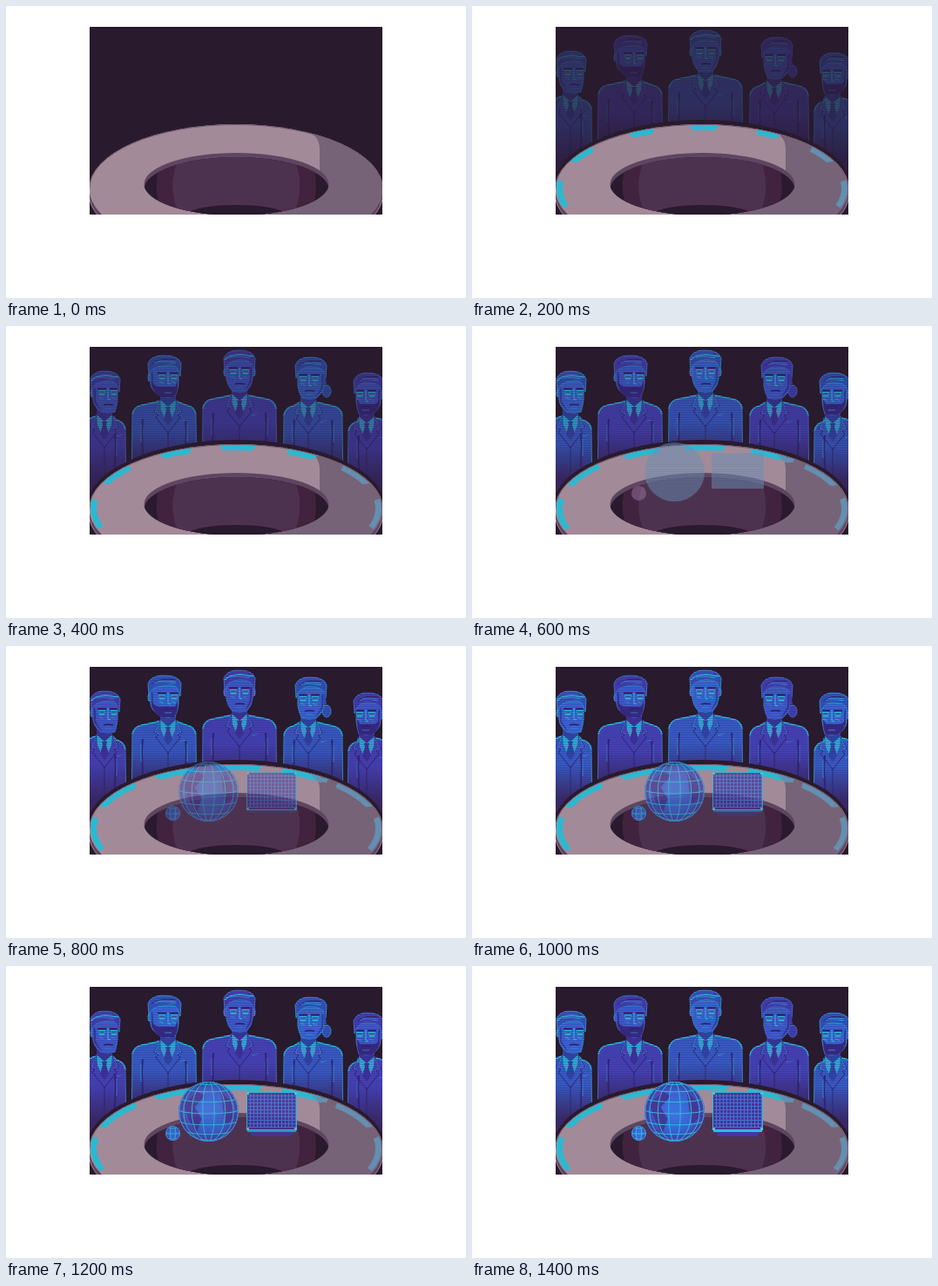
Write an HTML page with a canvas that moves like this. It is 528 by 336 pixels and loops after 1600 ms.

```html
<!DOCTYPE html>
<html lang="en">
<head>
<meta charset="utf-8">
<title>Hologram meeting</title>
<style>
html, body { margin: 0; width: 100%; height: 100%; overflow: hidden; background: #fff; }
canvas { display: block; }
</style>
</head>
<body>
<canvas id="stage" width="528" height="336"></canvas>
<script>
const W = 528, H = 336, STEP = 200, STEPS = 8;
const main = document.getElementById('stage').getContext('2d');
const layerCanvas = document.createElement('canvas');
layerCanvas.width = W;
layerCanvas.height = H;
const layer = layerCanvas.getContext('2d');

const DARK = '#291a2d', CYAN = '#2ab9d2', GLOW = '#2fc3e2', VIOLET = '#35277f';
const BLUE = { suit: '#3563cf', side: '#2f48a8', face: '#3670e2', hair: '#3059c4', edge: '#2fa6de', ink: '#2d2670' };
const PURPLE = { suit: '#4645bd', side: '#3c339a', face: '#3d62d8', hair: '#4440b4', edge: '#3a83d8', ink: '#302068' };

// State of each step: figure opacity, lamp length, prop opacity
const FIGURES = [0, .35, .68, .84, .97, 1, 1, 1];
const LAMPS = [0, .8, 1, 1.18, 1.32, 1.35, 1.35, 1.35];
const PROPS = [0, 0, 0, 0, .5, .75, .9, 1];

const rad = deg => deg * Math.PI / 180;

function poly(g, pts, fill, stroke, width = 1) {
  g.beginPath();
  pts.forEach(([x, y], i) => i ? g.lineTo(x, y) : g.moveTo(x, y));
  if (fill) { g.closePath(); g.fillStyle = fill; g.fill(); }
  if (stroke) { g.strokeStyle = stroke; g.lineWidth = width; g.stroke(); }
}

function oval(g, x, y, rx, ry, fill, stroke) {
  g.beginPath();
  g.ellipse(x, y, rx, ry, 0, 0, Math.PI * 2);
  if (fill) { g.fillStyle = fill; g.fill(); }
  if (stroke) { g.strokeStyle = stroke; g.lineWidth = 1; g.stroke(); }
}

function path(g, d, fill, stroke, width = 1) {
  const p = new Path2D(d);
  if (fill) { g.fillStyle = fill; g.fill(p); }
  if (stroke) { g.strokeStyle = stroke; g.lineWidth = width; g.stroke(p); }
}

function scanlines(g, alpha) {
  g.save();
  g.globalCompositeOperation = 'source-atop';
  g.globalAlpha = alpha;
  g.fillStyle = VIOLET;
  for (let y = 25; y < 240; y += 2) g.fillRect(96, y, 336, 1);
  g.restore();
}

// Draws on a clean layer, then blends it into the stage
function blend(alpha, lines, draw) {
  layer.clearRect(0, 0, W, H);
  draw(layer);
  scanlines(layer, lines);
  main.globalAlpha = alpha;
  main.drawImage(layerCanvas, 0, 0);
  main.globalAlpha = 1;
}

function drawBody(g, f, c) {
  const { neck: n, left: l, right: r, collar: y } = f, b = 200;
  const fade = g.createLinearGradient(0, y, 0, y + 72);
  fade.addColorStop(0, c.suit);
  fade.addColorStop(.45, c.suit);
  fade.addColorStop(1, '#39275c');
  path(g, `M${l} ${b}L${l + 1} ${y + 16}Q${l + 2} ${y + 6} ${l + 12} ${y + 4}L${n - 9} ${y - 1}
    L${n + 9} ${y - 1}L${r - 12} ${y + 4}Q${r - 2} ${y + 6} ${r - 1} ${y + 16}L${r} ${b}Z`, fade, c.edge);
  for (const s of [-1, 1]) {
    const tip = s < 0 ? l : r;
    path(g, `M${tip - s} ${y + 15}Q${tip - s * 2} ${y + 6} ${tip - s * 12} ${y + 4}L${n + s * 10} ${y}`, null, GLOW, 1.5);
  }
  poly(g, [[n - 9, y - 14], [n + 9, y - 14], [n + 9, y + 2], [n, y + 9], [n - 9, y + 2]], c.side);
  poly(g, [[n - 9, y - 2], [n, y + 6], [n + 9, y - 2], [n + 8, y + 10], [n, y + 28], [n - 8, y + 10]], GLOW);
  poly(g, [[n - 3, y + 6], [n + 3, y + 6], [n + 2, y + 10], [n + 5, y + 20], [n, y + 28], [n - 5, y + 20], [n - 2, y + 10]], c.side);
  for (const s of [-1, 1]) {
    poly(g, [[n + s * 9, y - 1], [n + s * 16, y + 12], [n + s * 11, y + 15], [n + s * 14, y + 18], [n, y + 36]], null, c.ink);
    poly(g, [[n + s * 10, y + 1], [n + s * 15, y + 12], [n + s * 10, y + 14]], null, c.edge);
    const side = s < 0 ? l + 13 : r - 13;
    poly(g, [[side, y + 20], [side + s, y + 34], [side - s * 2, b]], null, c.ink, 2);
    poly(g, [[side + s * 2, y + 26], [side + s * 2, y + 46]], null, c.edge);
  }
  poly(g, [[n, y + 34], [n, b]], null, c.ink);
  poly(g, [[n + 14, y + 23], [n + 21, y + 21]], null, c.edge);
}

function drawHead(g, f, c) {
  const { x, top: t, half: w, turn: d } = f, chin = t + 48;
  if (f.woman) {
    oval(g, x + 18, t + 39, 5, 7, c.hair, c.edge);
  } else {
    for (const s of [-1, 1]) if (s !== Math.sign(d)) oval(g, x + s * (w - 2), t + 25, 2, 5, c.face, GLOW);
  }
  path(g, `M${x - w + 3} ${t + 12}L${x - w + 3} ${t + 33}Q${x - w + 4} ${t + 41} ${x - 8 + d} ${chin - 1}
    Q${x + d} ${chin + 1} ${x + 8 + d} ${chin - 1}Q${x + w - 4} ${t + 41} ${x + w - 3} ${t + 33}L${x + w - 3} ${t + 12}Z`, c.face, c.edge);
  const back = d > 0 ? -1 : 1;
  poly(g, [[x + back * (w - 3), t + 15], [x + back * (w - 6), t + 22], [x + back * (w - 6), t + 34],
    [x + d + back * 6, chin], [x + back * (w - 4), t + 36]], c.side);
  if (f.beard) {
    path(g, `M${x - w + 4} ${t + 29}Q${x - w + 7} ${t + 37} ${x + d - 6} ${t + 36}L${x + d + 6} ${t + 36}
      Q${x + w - 6} ${t + 37} ${x + w - 4} ${t + 29}Q${x + w - 3} ${t + 41} ${x + d + 7} ${chin}L${x + d - 7} ${chin}
      Q${x - w + 4} ${t + 43} ${x - w + 4} ${t + 29}Z`, VIOLET);
  }
  for (const s of [-1, 1]) {
    const e = x + d + s * 7;
    poly(g, [[e - 5, t + 20], [e + 5, t + 20]], null, c.ink, 2);
    poly(g, [[e - 4, t + 22], [e + 4, t + 22], [e + 3, t + 28], [e - 3, t + 28]], GLOW);
    poly(g, [[e - 3, t + 24], [e + 3, t + 24]], null, c.ink);
    poly(g, [[e - 3, t + 30], [e + 2, t + 32]], null, c.edge, 2);
  }
  poly(g, [[x + d, t + 20], [x + d, t + 32], [x + d + 3, t + 33]], null, GLOW, 1.5);
  poly(g, [[x + d - 5, t + 39], [x + d, t + 38], [x + d + 6, t + 39]], null, c.ink, 1.5);
  poly(g, [[x + d - 4, t + 43], [x + d + 4, t + 43]], null, c.edge);

  const part = x + (f.woman ? -3 : d * 1.5);
  path(g, `M${x - w + 1} ${t + 24}L${x - w} ${t + 9}Q${x - w + 3} ${t + 1} ${x - 4} ${t}
    Q${x + w - 3} ${t - 1} ${x + w} ${t + 9}L${x + w - 1} ${t + 24}L${x + w - 4} ${t + 16}
    Q${x + w - 6} ${t + 11} ${part} ${t + 11}Q${x - w + 7} ${t + 12} ${x - w + 3} ${t + 18}Z`, c.hair, c.edge);
  if (f.woman) poly(g, [[x + w - 2, t + 16], [x + w, t + 32], [x + w - 5, t + 29]], c.hair);
  for (let i = 0; i < 3; i++) {
    path(g, `M${x - w + 4 + i * 3} ${t + 10 - i}Q${x - 6} ${t + 2 + i * 2} ${x + w - 6} ${t + 5 + i * 2}`, null, i ? c.edge : c.ink);
  }
  if (f.sweep) path(g, `M${x - w + 1} ${t + 11}Q${x - 7} ${t + 1} ${x + w - 2} ${t + 7}`, null, GLOW, 1.5);
}

const CAST = [
  { x: 114, top: 52, half: 17, turn: 3, neck: 113, left: 80, right: 138, collar: 104, sweep: true },
  { x: 182, top: 34, half: 19, turn: 4, neck: 186, left: 144, right: 219, collar: 87, beard: true },
  { x: 268, top: 28, half: 18, turn: 0, neck: 268, left: 225, right: 311, collar: 80, sweep: true },
  { x: 350, top: 36, half: 18, turn: -2, neck: 347, left: 318, right: 387, collar: 88, woman: true },
  { x: 416, top: 54, half: 17, turn: -3, neck: 414, left: 392, right: 452, collar: 106, beard: true }
];

function drawCast(g, step) {
  CAST.forEach((f, i) => {
    const c = (i + step) % 2 ? BLUE : PURPLE;
    drawBody(g, f, c);
    drawHead(g, f, c);
  });
}

function drawTable(g) {
  oval(g, 264, 210, 172, 79, DARK);
  oval(g, 264, 215, 169, 75, '#5c4661', '#9a8192');
  oval(g, 264, 210, 168.5, 74, '#a38a98');
  g.save();
  g.beginPath();
  g.ellipse(264, 210, 168.5, 74, 0, 0, Math.PI * 2);
  g.clip();
  path(g, 'M348 146Q360 150 360 166L360 205L300 215L300 240L440 240L440 178Q401 154 348 146Z', '#776377');
  g.restore();
  g.beginPath();
  g.ellipse(264, 210, 168, 73.5, 0, Math.PI, Math.PI * 2);
  g.lineWidth = 1;
  g.strokeStyle = '#725b70';
  g.stroke();
}

function drawPit(g) {
  g.save();
  g.beginPath();
  g.ellipse(264.5, 205, 106, 36, 0, 0, Math.PI * 2);
  g.fillStyle = '#5e4662';
  g.fill();
  g.clip();
  g.beginPath();
  g.ellipse(264.5, 211, 106, 37, 0, 0, Math.PI * 2);
  g.fillStyle = DARK;
  g.fill();
  g.clip();
  path(g, 'M182 170Q164 206 181 242L348 242Q364 206 347 170Z', '#42233f');
  path(g, 'M201 170Q182 206 200 242L329 242Q346 206 328 170Z', '#4d3250');
  oval(g, 264.5, 240, 56, 11, DARK);
  g.restore();
}

const LAMP_SPOTS = [[175, 14], [213, 9.7], [245, 7.1], [270.8, 7.4], [297.4, 6.7], [327, 9.7], [5, 14]];

function drawLamps(g, size) {
  if (!size) return;
  for (const [mid, half] of LAMP_SPOTS) {
    const grow = half > 10 ? 1 + (size - 1) * .4 : size;
    const a = rad(mid - half * grow), b = rad(mid + half * grow), cut = rad(1.4);
    g.beginPath();
    g.ellipse(264, 210, 167, 73, 0, a, b);
    g.ellipse(264, 210, 160, 67, 0, b - cut, a + cut, true);
    g.closePath();
    g.fillStyle = mid > 300 || mid < 10 ? '#638fb1' : CYAN;
    g.fill();
  }
  if (size > 1) path(g, 'M351 149L370 153L368 157L359 157Z', '#638fb1');
}

function drawGlobe(g, x, y, r, rings) {
  g.save();
  g.beginPath();
  g.arc(x, y, r, 0, Math.PI * 2);
  const shade = g.createRadialGradient(x, y, r * .2, x, y, r);
  shade.addColorStop(0, '#3b74e4');
  shade.addColorStop(.6, '#3a62d2');
  shade.addColorStop(1, '#463797');
  g.fillStyle = shade;
  g.fill();
  g.clip();
  if (r > 20) {
    path(g, `M${x - 29} ${y - 9}L${x - 13} ${y - 23}L${x - 4} ${y - 18}L${x - 16} ${y - 5}L${x - 8} ${y + 8}L${x - 14} ${y + 26}L${x - 23} ${y + 9}Z`, '#463798');
    path(g, `M${x + 14} ${y - 23}L${x + 25} ${y - 13}L${x + 31} ${y + 5}L${x + 20} ${y + 15}L${x + 17} ${y - 2}Z`, '#463798');
  }
  g.translate(x, y);
  for (let i = 0; i <= rings; i++) oval(g, 0, 0, r * Math.sin((i + .5) / (rings + 1) * Math.PI / 2), r, null, GLOW);
  for (let i = -rings; i <= rings; i++) {
    const a = i / (rings + 1) * Math.PI / 2, wide = r * Math.cos(a);
    g.beginPath();
    g.ellipse(0, r * Math.sin(a) - wide * .06, wide, wide * .13, 0, 0, Math.PI);
    g.strokeStyle = GLOW;
    g.stroke();
  }
  g.restore();
  oval(g, x, y, r - .5, r - .5, null, '#3d8fe0');
}

function drawPanel(g, glow) {
  g.globalAlpha = glow;
  poly(g, [[279, 190], [331, 190], [327, 196], [283, 196]], '#4138b0');
  g.fillStyle = GLOW;
  g.fillRect(277, 188, 56, 3);
  g.globalAlpha = 1;
  g.fillStyle = '#443697';
  g.fillRect(276, 145, 58, 43);
  g.fillStyle = '#4677dc';
  for (let x = 280; x < 333; x += 4) g.fillRect(x, 147, 1, 39);
  for (let y = 149; y < 187; y += 4) g.fillRect(278, y, 54, 1);
  g.strokeStyle = GLOW;
  g.lineWidth = 1;
  g.strokeRect(276.5, 145.5, 57, 43);
  g.fillStyle = '#55cae0';
  for (const x of [276, 331]) for (const y of [145, 186]) g.fillRect(x, y, 3, 3);
}

function drawProps(g, power) {
  drawGlobe(g, 232.5, 167.5, 34.5, 3);
  drawGlobe(g, 191.5, 192.5, 8.5, 1);
  drawPanel(g, power ** 3);
}

function drawGhosts(g) {
  oval(g, 232.5, 168, 34.5, 34, '#6d9abb');
  g.fillStyle = '#6d9abb';
  g.fillRect(275, 146, 60, 41);
  oval(g, 191.5, 192.5, 8.5, 8.5, '#a77fa1');
}

function render(step) {
  main.fillStyle = '#fff';
  main.fillRect(0, 0, W, H);
  main.save();
  main.beginPath();
  main.rect(96, 24, 336, 216);
  main.clip();
  main.fillStyle = DARK;
  main.fillRect(96, 24, 336, 216);
  if (FIGURES[step]) blend(FIGURES[step], .5, g => drawCast(g, step));
  drawTable(main);
  drawLamps(main, LAMPS[step]);
  drawPit(main);
  if (step === 3) blend(.5, .2, drawGhosts);
  if (PROPS[step]) blend(PROPS[step], .1, g => drawProps(g, PROPS[step]));
  main.restore();
}

function tick() {
  render(Math.floor(performance.now() / STEP) % STEPS);
  requestAnimationFrame(tick);
}
tick();
</script>
</body>
</html>
```
